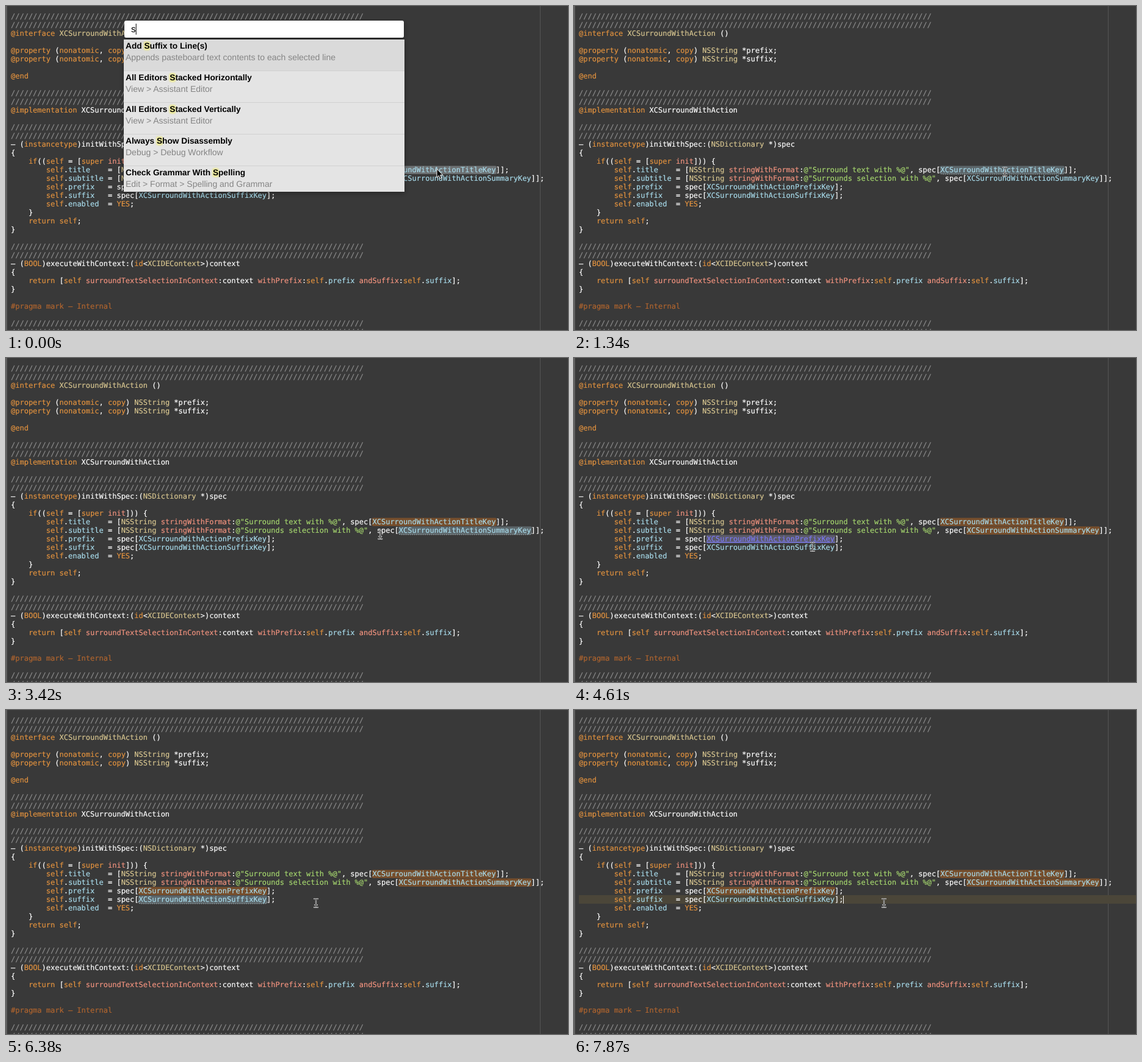
Animation of 921 by 532 pixels, one loop 8000 ms. Source, as an HTML page:

```html
<!DOCTYPE html>
<html lang="en">
<head>
<meta charset="utf-8">
<title>Save selection</title>
<style>
html, body { margin: 0; width: 100%; height: 100%; overflow: hidden; background: #393939; }
svg { display: block; width: 921px; height: 532px; }
text { white-space: pre; text-rendering: geometricPrecision; }
.code { font: 12px "DejaVu Sans Mono", monospace; }
.title { font: bold 13.7px "Liberation Sans", Arial, sans-serif; }
.sub { font: 14px "Liberation Sans", Arial, sans-serif; fill: #858585; }
.query { font: 15.4px "Liberation Sans", Arial, sans-serif; }
</style>
</head>
<body>
<svg id="stage" viewBox="0 0 921 532">
  <defs>
    <filter id="shade" x="-10%" y="-10%" width="120%" height="120%">
      <feDropShadow dx="0" dy="2" stdDeviation="4" flood-color="#000" flood-opacity=".35"/>
    </filter>
    <filter id="soft" x="-20%" y="-20%" width="140%" height="140%">
      <feGaussianBlur stdDeviation=".8"/>
    </filter>
  </defs>
  <rect width="921" height="532" fill="#393939"/>
  <rect width="1.7" height="532" fill="#666"/>
  <rect x="875" width="1" height="532" fill="#545454"/>
  <rect id="line" x="8" width="913" height="14" fill="#4b4639"/>
  <g id="marks"></g>
  <g id="code"></g>
  <rect id="caret" x="441" y="305" width="1" height="13" fill="#fff"/>
  <g id="panel">
    <g id="list">
      <rect x="193" y="55" width="460" height="250" fill="#e4e4e4" filter="url(#shade)"/>
      <rect x="193" y="55" width="460" height="52" fill="#dadada"/>
      <path d="M193 106.5h460M193 158.5h460M193 210.5h460M193 262.5h460" stroke="#d0d0d0"/>
      <g id="rows"></g>
    </g>
    <rect x="194" y="24" width="458" height="28" rx="3" fill="#fff" filter="url(#shade)"/>
    <rect id="picked" x="205" y="29" height="18" fill="#aacdf8"/>
    <text id="query" class="query" x="205" y="43"></text>
    <rect id="bar" y="29" width="1" height="18" fill="#000"/>
  </g>
  <path id="arrow" d="M0 0V14L3.2 11 5.3 15.9 7.7 14.9 5.6 10.2H10Z" fill="#000" stroke="#fff" stroke-width="1"/>
  <g id="beam" fill="none" stroke-linecap="round">
    <path d="M-3-7Q0-7 0-5V5Q0 7-3 7M3-7Q0-7 0-5M0 5Q0 7 3 7M-2 3H2" stroke="#e8e8e8" stroke-width="2.2"/>
    <path d="M-3-7Q0-7 0-5V5Q0 7-3 7M3-7Q0-7 0-5M0 5Q0 7 3 7M-2 3H2" stroke="#2a2a2a" stroke-width=".9"/>
  </g>
</svg>
<script>
const LOOP = 8000, STEP = 148.35;
const COL = 7.2246, LEFT = 8, TOP = 10, ROW = 14;

const $ = id => document.getElementById(id);
function add(parent, tag, attrs, text) {
  const node = document.createElementNS('http://www.w3.org/2000/svg', tag);
  for (const key in attrs) node.setAttribute(key, attrs[key]);
  if (text !== undefined) node.textContent = text;
  return parent.appendChild(node);
}
const set = (node, attrs) => { for (const key in attrs) node.setAttribute(key, attrs[key]); };
const show = (node, on) => node.setAttribute('visibility', on ? 'visible' : 'hidden');
const rowY = row => TOP + row * ROW;
const colX = col => LEFT + col * COL;

// "~x" switches the ink to colour x
const INK = {
  w: '#ffffff', o: '#e2923f', y: '#d8c690', s: '#f2937f',
  g: '#a5d66e', b: '#a8dbeb', k: '#a8dbeb', c: '#8b8b8b', p: '#b0652f'
};
const RULE = '~c' + '/'.repeat(80);
const SOURCE = [
  RULE, RULE,
  '~o@interface ~yXCSurroundWithAction~w ()',
  '',
  '~o@property ~w(~ononatomic~w, ~ocopy~w) ~yNSString ~w*prefix;',
  '~o@property ~w(~ononatomic~w, ~ocopy~w) ~yNSString ~w*suffix;',
  '',
  '~o@end',
  '',
  RULE, RULE,
  '~o@implementation ~wXCSurroundWithAction',
  '',
  RULE, RULE,
  '~w– (~oinstancetype~w)initWithSpec:(~yNSDictionary ~w*)spec',
  '~w{',
  '~o    if~w((~oself~w = [~osuper ~sinit~w])) {',
  '~o        self~w.~btitle    ~w= [~yNSString ~sstringWithFormat~w:~g@"Surround text with %@"~w, spec[~kXCSurroundWithActionTitleKey~w]];',
  '~o        self~w.~bsubtitle ~w= [~yNSString ~sstringWithFormat~w:~g@"Surrounds selection with %@"~w, spec[~kXCSurroundWithActionSummaryKey~w]];',
  '~o        self~w.~bprefix   ~w= spec[~kXCSurroundWithActionPrefixKey~w];',
  '~o        self~w.~bsuffix   ~w= spec[~kXCSurroundWithActionSuffixKey~w];',
  '~o        self~w.~benabled  ~w= ~oYES~w;',
  '~w    }',
  '~o    return self~w;',
  '~w}',
  '',
  RULE, RULE,
  '~w– (~oBOOL~w)executeWithContext:(~oid~w<~yXCIDEContext~w>)context',
  '~w{',
  '~o    return ~w[~oself ~ssurroundTextSelectionInContext~w:context ~swithPrefix~w:~oself~w.~bprefix ~sandSuffix~w:~oself~w.~bsuffix~w];',
  '~w}',
  '',
  '~p#pragma mark – Internal',
  '',
  RULE, RULE
];

// step ranges for each key: selected from/until, dashed from, saved from
const KEYS = [
  { from: 0, until: 19, dash: 9, saved: 19 },
  { from: 21, until: 28, dash: 22, saved: 28 },
  { from: 29, until: 35, dash: 30, saved: 35 },
  { from: 36, until: 44, dash: 37, saved: Infinity }
];

let keyCount = 0;
SOURCE.forEach((src, row) => {
  const line = add($('code'), 'text', { class: 'code', x: LEFT, y: rowY(row) + 11 });
  let col = 0;
  for (const part of src.split('~').slice(1)) {
    const ink = part[0], text = part.slice(1);
    const span = add(line, 'tspan', { fill: INK[ink], stroke: INK[ink], 'stroke-width': .18 }, text);
    if (ink === 'k') addKey(KEYS[keyCount++], span, row, col, text.length);
    col += text.length;
  }
});

function addKey(key, span, row, col, length) {
  const x = colX(col) - .8, y = rowY(row), w = length * COL + 2;
  key.span = span;
  key.box = add($('marks'), 'rect', { x, y: y + .5, width: w, height: 13.5, rx: 2 });
  key.edge = add($('marks'), 'path', {
    d: `M${x} ${y + 10}q0 4 4 4h${w - 8}q4 0 4-4`,
    fill: 'none', stroke: '#a3adb0', 'stroke-dasharray': '2 1.5'
  });
}

const ALL = [
  ['Add Suffix to Line(s)', 'Appends pasteboard text contents to each selected line'],
  ['All Editors Stacked Horizontally', 'View > Assistant Editor'],
  ['All Editors Stacked Vertically', 'View > Assistant Editor'],
  ['Always Show Disassembly', 'Debug > Debug Workflow'],
  ['Check Grammar With Spelling', 'Edit > Format > Spelling and Grammar']
];
const FOUND = [['Save selection', 'Save non-contiguous blocks of selected text']];
const TYPED = ['s', 'sa', 'sav', 'save', 'save s', 'save se', 'save sele'];

function fillRows(query) {
  const rows = $('rows');
  rows.textContent = '';
  (query.length > 1 ? FOUND : ALL).forEach(([title, sub], i) => {
    const y = 55 + 52 * i;
    const glow = add(rows, 'rect', { y: y + 3, height: 15, rx: 4, fill: '#ebe89a', filter: 'url(#soft)' });
    const label = add(rows, 'text', { class: 'title', x: 196, y: y + 15 }, title);
    add(rows, 'text', { class: 'sub', x: 196, y: y + 34 }, sub);
    const at = title.search(new RegExp('\\b' + query, 'i'));
    const before = at ? label.getSubStringLength(0, at) : 0;
    set(glow, { x: 195 + before, width: label.getSubStringLength(at, query.length) + 2 });
  });
}

function drawPanel(k) {
  const again = k >= 48;
  const open = k < 8 || (again && k < 53);
  $('panel').setAttribute('display', open ? 'inline' : 'none');
  if (!open) return open;
  const query = TYPED[Math.min(k, TYPED.length - 1)];
  fillRows(query);
  const fade = again ? [.45, .81, .97][Math.min(k - 48, 2)] : k ? .97 : 1;
  $('list').setAttribute('opacity', fade);
  $('query').textContent = query;
  const width = $('query').getComputedTextLength();
  set($('picked'), { width });
  set($('bar'), { x: 205 + width });
  show($('picked'), again);
  show($('bar'), !again);
  return open;
}

// pointer stops: step, x, y
const PATH = [
  [11, 706, 272], [14, 800, 335], [16, 738, 294], [19, 740, 283], [21, 740, 283],
  [26, 380, 303], [29, 380, 303], [31, 391, 310], [35, 400, 314], [36, 400, 314], [43, 508, 317]
];
function pointer(k) {
  const i = PATH.findIndex(stop => stop[0] >= k);
  if (i < 0) return PATH[PATH.length - 1].slice(1);
  if (i === 0) return PATH[0].slice(1);
  const [k0, x0, y0] = PATH[i - 1], [k1, x1, y1] = PATH[i];
  const u = (k - k0) / (k1 - k0), e = u * u * (3 - 2 * u);
  return [x0 + (x1 - x0) * e, y0 + (y1 - y0) * e];
}

function currentLine(k) {
  if (k === 20) return 19;
  if (k === 28) return 20;
  return k === 35 || k >= 44 ? 21 : -1;
}

function draw(k) {
  const open = drawPanel(k);
  const link = k === 30 || k === 31;

  KEYS.forEach((key, i) => {
    const selected = k >= key.from && k < key.until;
    const hot = link && i === 2;
    const ink = hot ? '#7a78f2' : INK.k;
    show(key.box, selected || k >= key.saved);
    show(key.edge, selected && k >= key.dash && !hot);
    key.box.setAttribute('fill', !selected ? '#764e2c' : hot ? '#5b5a68' : open ? '#6d7173' : '#5c666a');
    set(key.span, { fill: ink, stroke: ink, 'text-decoration': hot ? 'underline' : 'none' });
  });

  const row = currentLine(k);
  show($('line'), row >= 0);
  if (row >= 0) set($('line'), { y: rowY(row) });
  show($('caret'), k >= 44 && !open);

  const [x, y] = pointer(k);
  set($('arrow'), { transform: `translate(${x} ${y - 4.5})` });
  set($('beam'), { transform: `translate(${x} ${y})` });
  show($('arrow'), open);
  show($('beam'), !open);
}

let last = -1;
function tick(now) {
  const k = Math.floor((now % LOOP + 4) / STEP);
  if (k !== last) draw(last = k);
  requestAnimationFrame(tick);
}
draw(0);
requestAnimationFrame(tick);
</script>
</body>
</html>
```
